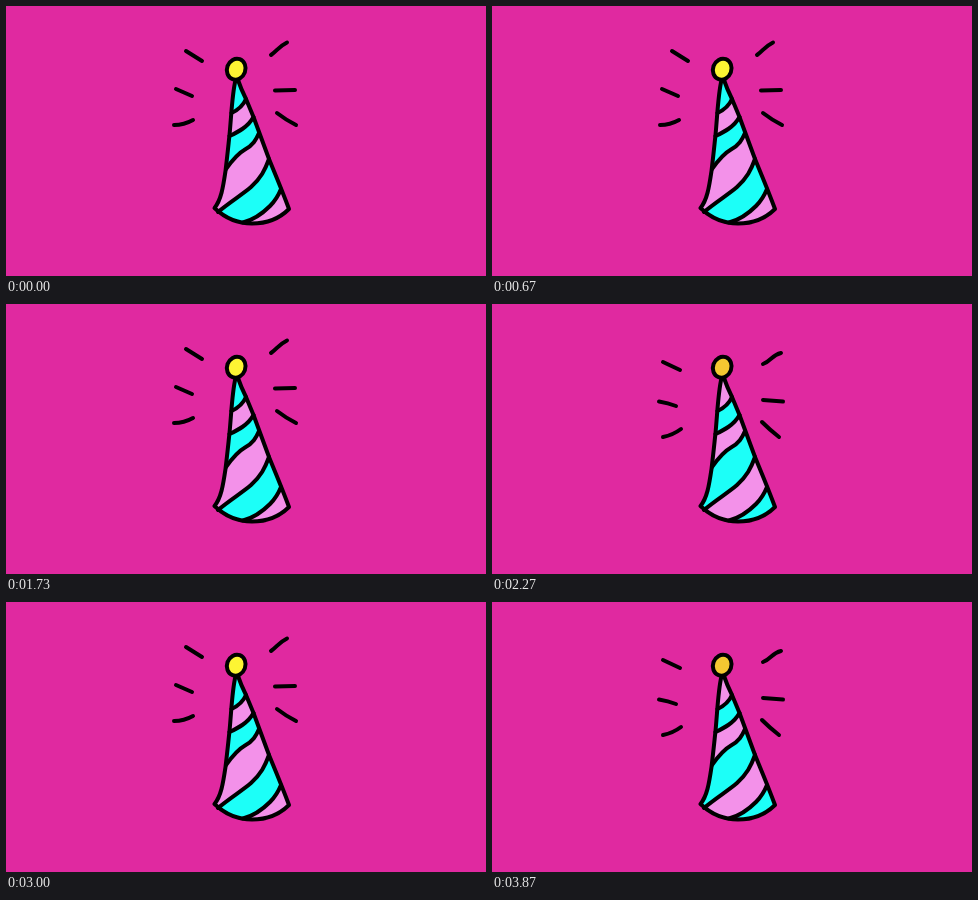
Animation, 480 px wide and 270 px high, one loop 3.99 s. Source, as an HTML page:

```html
<!DOCTYPE html>
<html lang="en">
<head>
<meta charset="utf-8">
<title>Party hat</title>
<style>
  html, body { margin: 0; width: 100%; height: 100%; overflow: hidden; background: #e029a0; }
  svg { display: block; width: 100%; height: 100%; }
  .ink { fill: none; stroke: #000; stroke-width: 4; stroke-linecap: round; stroke-linejoin: round; }
</style>
</head>
<body>
<svg viewBox="0 0 480 270">
  <defs>
    <path id="cone" d="M229.5 74C226 89 225.5 108 223.5 129C222 143 221 153 219.5 165C217 182 215 194 208.5 202C220 213 232 217.5 246 217.5C261 217.5 273 213 283 203C276 184 270 170 263 153L247.5 111L240 93Q235 83 232 74Z"/>
    <clipPath id="inside"><use href="#cone"/></clipPath>
  </defs>
  <g id="bands" clip-path="url(#inside)"></g>
  <path id="seams" class="ink"/>
  <use href="#cone" class="ink"/>
  <ellipse id="bobble" class="ink" cx="230.2" cy="63.2" rx="9.2" ry="10.6" transform="rotate(20 230.2 63.2)"/>
  <path id="rays" class="ink"/>
</svg>
<script>
const $ = id => document.getElementById(id);
const CYAN = '#1cfff8', PINK = '#f391e9';
const LOOP = 3990, FRAME = LOOP / 60, HOLD = 4.42; // HOLD is in frames

const seams = [
  'M225.5 107C232 104 237 100 240 93',
  'M223.5 130C232 126 242 121 247.5 111',
  'M220 163C225 156 231 148 239 143.5C247 139 250 134 253 127',
  'M212 206C224 196 237 188 245 181C255 172 259 164 263 153',
  'M237 216.5C247 214 257 207 264 200Q271 193 275 183'
];

const poses = [
  {
    colors: [CYAN, PINK],
    bobble: '#fdf533',
    rays: 'M180 45L196 55M265 49C271 45 272 41 281 36.5M170 83L186 90M168 119Q178 119 187 114M269 84.5L289 84M271 107Q280 114 290 119'
  },
  {
    colors: [PINK, CYAN],
    bobble: '#f4c831',
    rays: 'M171 58L188 66M271 60C279 57 280 51 289 49M167 97.5Q176 99 184 102M171 133Q181 131 189 125M271 96L291 97.5M270 118Q278 126 287 133'
  }
];

// Each band covers everything below its seam, so later bands overlap earlier ones.
const areas = ['M190 60H300V240H190Z', ...seams.map(d => d + 'L300 240H190Z')];
$('bands').innerHTML = areas.map(d => `<path d="${d}"/>`).join('');
$('seams').setAttribute('d', seams.join(''));

function show({ colors, bobble, rays }) {
  [...$('bands').children].forEach((band, i) => band.setAttribute('fill', colors[i % 2]));
  $('bobble').style.fill = bobble;
  $('rays').setAttribute('d', rays);
}

function tick() {
  const frame = Math.floor(performance.now() % LOOP / FRAME);
  // The pose whose start, rounded down to a whole frame, was passed last.
  const step = Math.ceil((frame + 1) / HOLD) - 1;
  show(poses[step % 2]);
  requestAnimationFrame(tick);
}
tick();
</script>
</body>
</html>
```
